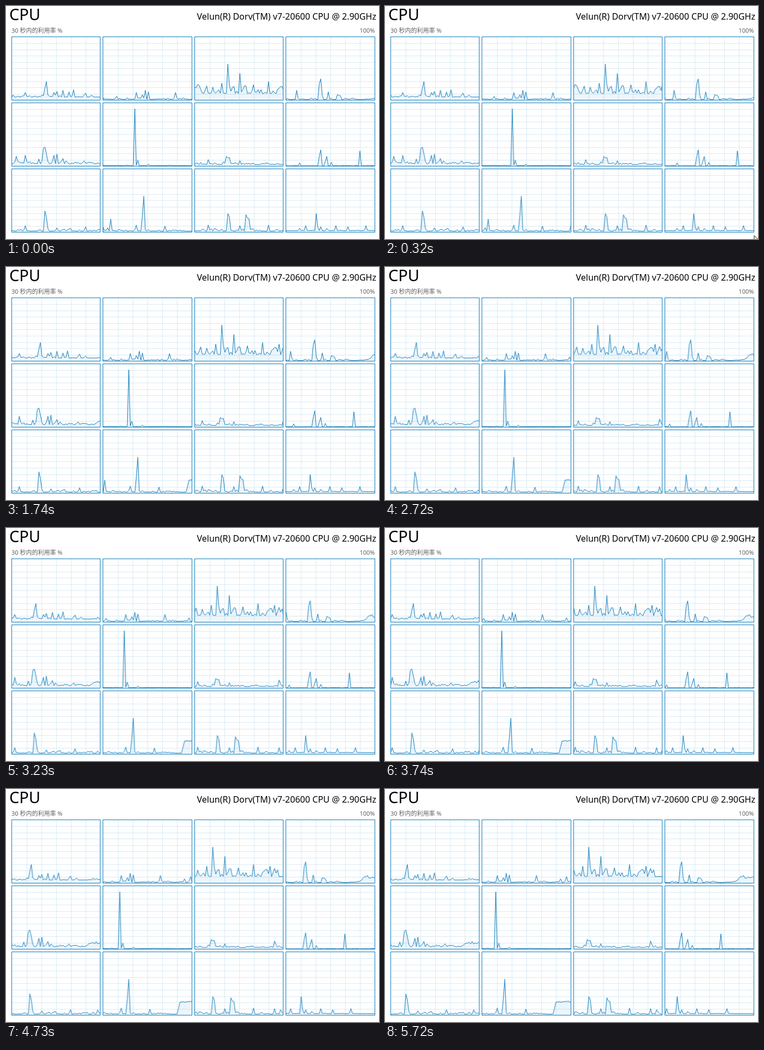
These frames come from a looping animation (683x427 px, 6.08 s). An HTML page:

```html
<!DOCTYPE html>
<html lang="zh">
<head>
<meta charset="utf-8">
<title>CPU</title>
<style>
  html, body { margin: 0; width: 100%; height: 100%; overflow: hidden; background: #fff; }
  #stage { display: block; width: 683px; height: 427px; font-family: "Noto Sans", "Noto Sans CJK SC", "Noto Sans CJK", sans-serif; }
  .small { font-size: 11px; fill: #606060; }
  .grid { fill: none; stroke: #d9eaf4; }
  .frame { fill: none; stroke: #117dbb; }
  .trace { fill: rgba(17, 125, 187, .075); stroke: #117dbb; animation: scroll 6080ms infinite; }
  #cursor { fill: #fff; stroke: #111; animation: point 6080ms linear infinite; }

  /* Twelve jumps of one sample, 498 ms apart */
  @keyframes scroll {
    0% { transform: translateX(0); animation-timing-function: step-end; }
    3.75% { transform: translateX(-2.76px); animation-timing-function: steps(11, end); }
    93.85%, 100% { transform: translateX(-33.12px); }
  }
  @keyframes point {
    0%, 1.8% { transform: translate(684px, 428px); }
    7.2%, 11.84% { transform: translate(671.5px, 416.5px); }
    12.6%, 20.7% { transform: translate(670.5px, 414.5px); }
    23.5%, 100% { transform: translate(670.5px, 429px); }
  }
</style>
</head>
<body>
<svg id="stage" viewBox="0 0 683 427">
  <text x="6" y="26" font-size="29">CPU</text>
  <text x="678" y="25" font-size="16" text-anchor="end">Velun(R) Dorv(TM) v7-20600 CPU @ 2.90GHz</text>
  <text class="small" x="10" y="49">30 秒内的利用率 %</text>
  <text class="small" x="675.5" y="49" text-anchor="end">100%</text>
  <g id="charts"></g>
  <path id="cursor" d="M0 0V16.5L4 12.8L6.6 18.8L9.2 17.7L6.7 11.9H11.6Z"/>
</svg>
<script>
  const NS = 'http://www.w3.org/2000/svg';
  const HEIGHT = 116, STEP = 2.76, SAMPLES = 72;
  const charts = document.getElementById('charts');

  let seed = 7;
  const random = () => (seed = (seed * 16807) % 2147483647) / 2147483647;

  function add(parent, tag, attrs) {
    const el = document.createElementNS(NS, tag);
    for (const key in attrs) el.setAttribute(key, attrs[key]);
    return parent.appendChild(el);
  }

  // Idle load with random spikes, named peaks, and an optional lasting rise near the end
  function load({ base, spike, peaks, rise = 0 }) {
    return Array.from({ length: SAMPLES }, (_, i) => {
      const lift = rise * Math.min(1, Math.max(0, (i - 59) / 2));
      const idle = base + lift + spike * random() ** 3;
      return peaks[i] ?? idle;
    });
  }

  function chart(col, row, spec) {
    const width = 162 + col % 2;
    const left = Math.floor(10.3 + col * 167.4), top = Math.floor(56.5 + row * 121);
    const box = add(charts, 'svg', { x: left, y: top, width: width + 1, height: HEIGHT + 1 });
    let grid = '';
    for (let i = 1; i < 6; i++) grid += `M${Math.ceil(i * 27.15) + .5} 0V${HEIGHT}`;
    for (let i = 1; i < 10; i++) grid += `M0 ${Math.ceil(i * HEIGHT / 10) + .5}H${width}`;
    add(box, 'path', { class: 'grid', d: grid });

    const shift = .5 + col % 2 * .4;
    const points = load(spec).map((v, i) => `L${i * STEP + shift} ${HEIGHT + .5 - v}`);
    add(box, 'path', { class: 'trace', d: `M${shift} 130${points.join('')}V130` });
    add(box, 'rect', { class: 'frame', x: .5, y: .5, width, height: HEIGHT });
  }

  chart(0, 0, { base: 5.5, spike: 5, peaks: { 9: 14, 22: 22, 23: 34, 28: 14, 30: 16, 34: 18, 38: 15, 41: 19, 49: 13 } });
  chart(1, 0, { base: 1.5, spike: 3, peaks: { 9: 7, 22: 14, 26: 10, 28: 18, 30: 15, 48: 14, 64: 8, 68: 12 } });
  chart(2, 0, { base: 12, spike: 17, peaks: { 8: 26, 18: 31, 22: 66, 30: 49, 34: 26, 39: 28, 49: 34, 60: 31, 63: 27 } });
  chart(3, 0, { base: 1, spike: 3, rise: 8, peaks: { 7: 18, 22: 30, 23: 39, 24: 9, 28: 15, 34: 10, 35: 9, 36: 8, 64: 14 } });
  chart(0, 1, { base: 4.5, spike: 6, rise: 5, peaks: { 3: 18, 9: 20, 18: 13, 21: 33, 22: 35, 23: 23, 28: 20, 30: 22, 34: 14 } });
  chart(1, 1, { base: .8, spike: 1, peaks: { 21: 105, 22: 2, 23: 11, 30: 4 } });
  chart(2, 1, { base: 3, spike: 4, peaks: { 9: 12, 19: 8, 21: 18, 22: 15, 23: 16, 30: 10, 63: 15, 64: 8 } });
  chart(3, 1, { base: .6, spike: .6, peaks: { 9: 6, 22: 18, 23: 30, 26: 9, 27: 18, 30: 7, 49: 28 } });
  chart(0, 2, { base: 2, spike: 4, peaks: { 9: 12, 22: 39, 23: 28, 24: 7, 30: 8, 39: 7, 49: 10, 67: 10 } });
  chart(1, 2, { base: 2, spike: 3, rise: 22, peaks: { 0: 9, 3: 8, 5: 24, 22: 13, 26: 30, 27: 66, 41: 11 } });
  chart(2, 2, { base: 2, spike: 5, peaks: { 9: 13, 22: 34, 23: 28, 30: 12, 34: 32, 35: 26, 36: 25, 49: 13, 63: 12, 67: 10 } });
  chart(3, 2, { base: 2.8, spike: 1, peaks: { 9: 7, 13: 12, 20: 34, 21: 10, 23: 10, 27: 7, 33: 12, 41: 10, 53: 12 } });
</script>
</body>
</html>
```
